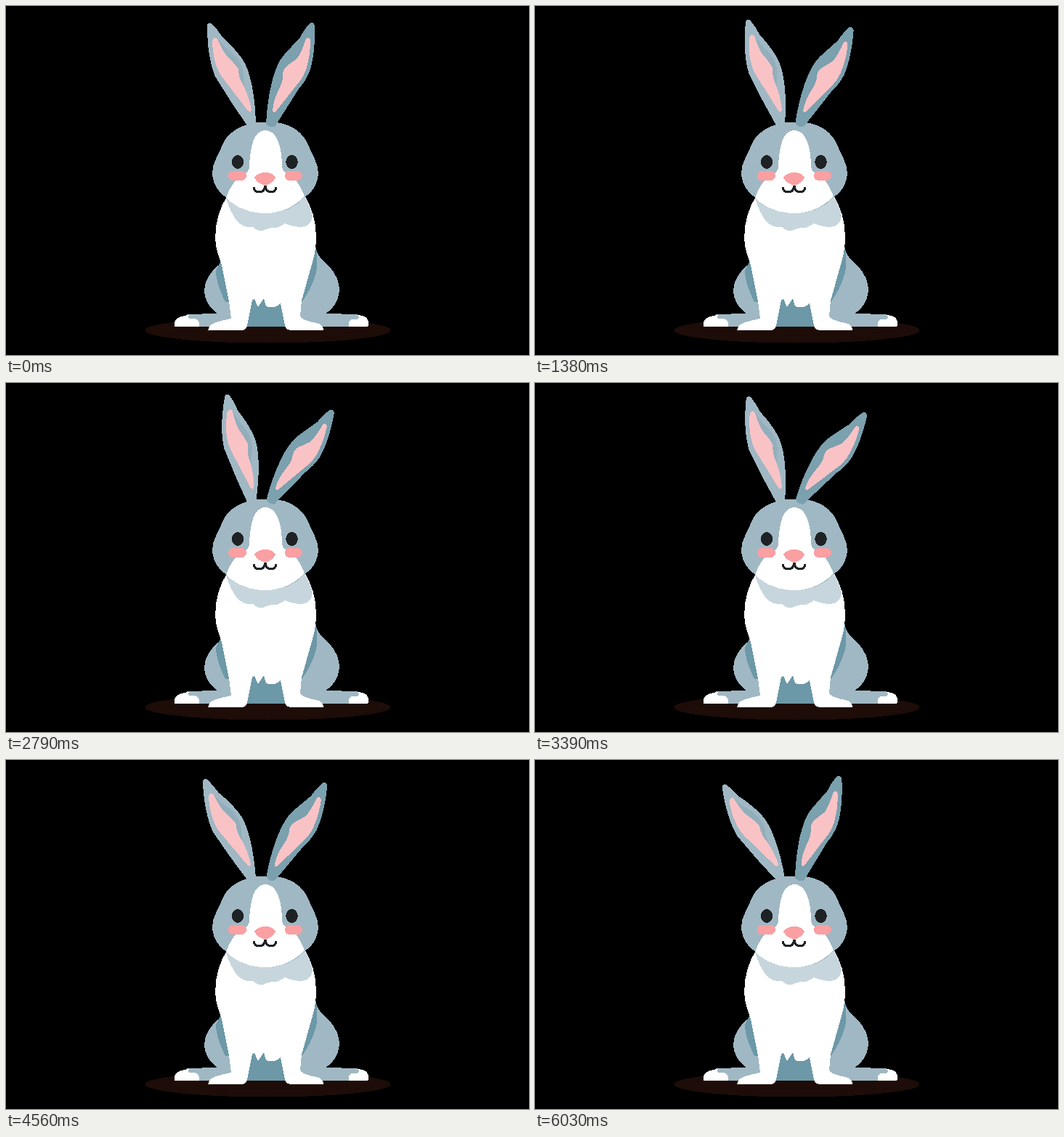
Write an HTML page that moves like this. It is 720 px wide and 480 px high and loops after 8.94 s.

```html
<!DOCTYPE html>
<html lang="en">
<head>
<meta charset="utf-8">
<title>Rabbit</title>
<style>
html, body { margin: 0; width: 100%; height: 100%; overflow: hidden; background: #000; }
svg { display: block; width: 100%; height: 100%; }
.fur { fill: #a0b8c4; }
.dark { fill: #6c98a7; }
.white { fill: #fff; }
.pink { fill: #f9c3c6; }
.blush { fill: #fa9fa2; }
.ink { fill: #1f2225; }
</style>
</head>
<body>
<svg viewBox="0 0 720 480" shape-rendering="crispEdges">
  <ellipse cx="360.5" cy="446" rx="169" ry="17.5" fill="#1d0c08"/>

  <!-- haunches and hind feet -->
  <path class="fur" d="M299 351C281 364 273 378 273 392Q274 410 291 423L249 424V441H310V360Z"/>
  <path class="fur" d="M426 333C430 346 436 350 445 358Q459 374 459 391C458 408 449 417 440 423L484 424L488 430V441H390L405 380Z"/>
  <path class="white" d="M232 441V435Q234 427 252 425Q249 428 253 430Q265 429 266 436V441Z"/>
  <path class="white" d="M472 441V435Q475 429 484 431L486 428L484 425Q499 426 499 436V439L497 441Z"/>

  <!-- shaded sides and belly -->
  <path class="dark" d="M296 350L289 364Q289 381 302 407H310Z"/>
  <path class="dark" d="M427 331Q430 352 427 367Q421 389 404 412L402 380Z"/>
  <path class="dark" d="M330 398H388V441H328Z"/>

  <path class="white" d="M304 262C295 277 288 295 288 320C289 337 294 347 297 356L307 406L310 430Q283 435 280 441L278 446H323Q331 446 332 440L339 404L342 403L347 414L355 402L358 413Q370 417 378 409L384 440Q386 446 393 446H437Q437 438 427 436Q406 432 405 426L407 405L422 352Q427 335 427 318C427 295 421 278 411 260Z"/>
  <path fill="#c7d6dd" d="M303 264Q309 285 319 297Q329 306 341 304Q348 313 358 307Q369 304 373 305Q380 302 384 299Q401 306 412 303Q421 299 422 289Q419 275 411 262Z"/>

  <g id="left">
    <path class="fur" d="M277 27Q278 22 283 24Q292 33 298 43Q312 55 324 71C337 88 343 125 344 162L341 172H336L331 163L310 132L288 97Q277 70 277 27Z"/>
    <path fill="#93aebb" d="M290 43Q299 56 312 65Q325 78 327 92Q326 103 329 112L316 95Z"/>
    <path class="pink" d="M284 48Q286 41 291 45Q296 58 304 69Q315 79 320 87Q320 99 327 110Q335 126 338 143Q337 148 333 144L300 101Q285 83 284 48Z"/>
  </g>

  <!-- head -->
  <path class="fur" d="M343 160H372C395 163 409 175 416 191C421 204 430 216 430 231C428 249 419 258 411 263C398 278 380 285 357 285C335 285 316 278 304 264C292 256 284 244 284 229C284 216 293 204 298 191Q307 168 343 160Z"/>
  <path class="white" d="M357 171C372 171 380 191 380 222Q381 229 394 235Q403 241 411 262Q388 285 357 285Q325 285 303 264Q311 242 322 235Q335 229 335 222C336 193 341 171 357 171Z"/>
  <ellipse class="ink" cx="319" cy="214.5" rx="8.2" ry="9.5"/>
  <ellipse class="ink" cx="393.5" cy="214.5" rx="8.2" ry="9.5"/>
  <rect class="blush" x="306" y="227" width="25" height="13" rx="6.5"/>
  <rect class="blush" x="384" y="227" width="24" height="13" rx="6.5"/>
  <path class="blush" d="M342 236Q347 229 357 229Q367 229 371 236Q367 244 357 247Q346 244 342 236Z"/>
  <path d="M341 249Q342 256 348 256Q356 256 357 247Q358 256 365 256Q371 256 372 249" fill="none" stroke="#1f2225" stroke-width="3"/>

  <g id="right" fill="#7ba0ae">
    <path d="M425 27Q424 22 419 23Q411 31 405 43Q392 57 383 67C368 83 360 124 358 162Q363 168 370 166L403 114Q412 104 418 90Q426 65 425 27Z"/>
    <path class="pink" d="M419 48Q418 41 413 45Q408 61 401 72L386 83Q380 88 381 99Q380 107 375 116Q368 130 367 144Q369 149 373 143L400 109Q412 96 415 80Q419 65 419 48Z"/>
  </g>
</svg>
<script>
const LOOP = 8940, STEP = 30;
const ears = [
  { id: "left", pivot: "338 163", peak: 2700, high: 10.5, end: 5400, low: -8.5 },
  { id: "right", pivot: "367 164", peak: 3390, high: 14.3, end: 6030, low: -1.1 }
];
for (const ear of ears) ear.node = document.getElementById(ear.id);

// Steady swing up to the peak, steady swing back, then rest.
function angle({ peak, high, end, low }, t) {
  if (t < peak) return high * t / peak;
  return high + (low - high) * Math.min(1, (t - peak) / (end - peak));
}

function draw() {
  const t = Math.floor(performance.now() % LOOP / STEP) * STEP;
  for (const ear of ears)
    ear.node.setAttribute("transform", `rotate(${angle(ear, t)} ${ear.pivot})`);
  requestAnimationFrame(draw);
}
draw();
</script>
</body>
</html>
```
